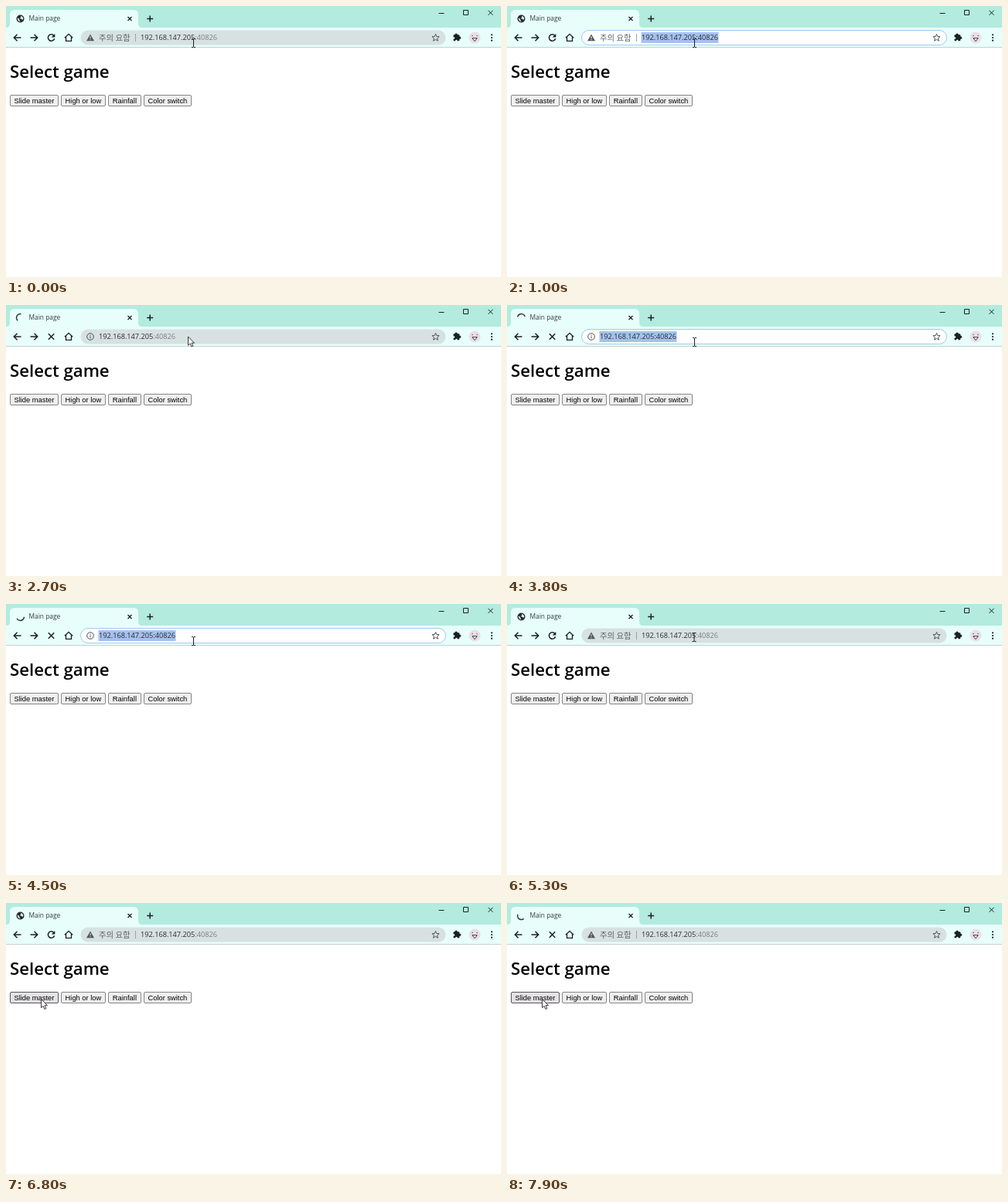
Animation, 640 px wide and 351 px high, one loop 8 s. Source, as an HTML page with a canvas:

```html
<!DOCTYPE html>
<html lang="en">
<head>
<meta charset="utf-8">
<title>Main page</title>
<style>
  html, body { margin: 0; width: 100%; height: 100%; overflow: hidden; background: #fff; }
  canvas { display: block; width: 640px; height: 351px; }
</style>
</head>
<body>
<canvas id="stage"></canvas>
<script>
const W = 640, H = 351, LOOP = 8000, STEP = 100;
const UI = '"Open Sans", "Noto Sans", sans-serif';
const HANGUL = '"Noto Sans CJK KR", "Noto Sans CJK", sans-serif';
const ARIAL = '"Liberation Sans", Arial, sans-serif';
const INK = '#1c2022', MINT = '#b3ebdf', BAR = '#e7fefb', FIELD = '#d7e1e1';
const HOST = '192.168.147.205', PORT = ':40826';
const BUTTONS = [
  ['Slide master', 5, 62], ['High or low', 71, 57],
  ['Rainfall', 132, 42], ['Color switch', 178, 61]
];

// Pointer path: time, x, y
const PATH = [
  [0, 242, 48], [2100, 242, 48], [2500, 235.5, 41], [3300, 235.5, 41], [3600, 242, 48],
  [5000, 242, 48], [5300, 241.5, 43], [5500, 241, 42], [5700, 237, 46], [5900, 205, 78],
  [6100, 140, 118], [6300, 80, 140], [6500, 52, 132], [6600, 45.5, 124.5]
];

const canvas = document.getElementById('stage');
const ctx = canvas.getContext('2d');
const scale = window.devicePixelRatio || 1;
canvas.width = W * scale;
canvas.height = H * scale;

const within = (t, a, b) => t >= a && t < b;

function text(str, x, y, font, color, align = 'left') {
  ctx.font = font;
  ctx.fillStyle = color;
  ctx.textAlign = align;
  ctx.fillText(str, x, y);
}

function shape(d, x, y, { fill, stroke, width = 1.4 }) {
  const path = new Path2D(d);
  ctx.save();
  ctx.translate(x, y);
  ctx.lineWidth = width;
  if (fill) { ctx.fillStyle = fill; ctx.fill(path); }
  if (stroke) { ctx.strokeStyle = stroke; ctx.stroke(path); }
  ctx.restore();
}

function disc(x, y, r, color) {
  ctx.beginPath();
  ctx.arc(x, y, r, 0, Math.PI * 2);
  ctx.fillStyle = color;
  ctx.fill();
}

function box(x, y, w, h, r, fill, stroke) {
  ctx.beginPath();
  ctx.roundRect(x, y, w, h, r);
  ctx.fillStyle = fill;
  ctx.fill();
  if (stroke) {
    ctx.strokeStyle = stroke;
    ctx.lineWidth = 1;
    ctx.stroke();
  }
}

function pointerAt(t) {
  const i = PATH.findIndex(p => p[0] > t);
  if (i < 0) return PATH[PATH.length - 1].slice(1);
  const [t0, x0, y0] = PATH[i - 1], [t1, x1, y1] = PATH[i];
  const k = (t - t0) / (t1 - t0);
  return [x0 + (x1 - x0) * k, y0 + (y1 - y0) * k];
}

function stateAt(t) {
  const firstLoad = within(t, 2000, 4900);
  const [x, y] = pointerAt(t);
  return {
    t, x, y,
    loading: firstLoad || t >= 7100,
    chip: !firstLoad,
    focus: within(t, 500, 2000) || within(t, 3700, 4600),
    selected: within(t, 500, 1400) || within(t, 3700, 4600),
    caret: within(t, 1400, 2000),
    beam: t < 2300 || within(t, 3400, 5800),
    hover: t >= 6500
  };
}

function spinner(t) {
  // One counter-clockwise turn takes 1320 ms
  const [ref, angle] = t < 5000 ? [3800, 268] : [7900, 125];
  const mid = (angle - 360 * (t - ref) / 1320) * Math.PI / 180;
  const half = 75 * Math.PI / 180;
  ctx.beginPath();
  ctx.arc(18.5, 16.5, 5, mid - half, mid + half);
  ctx.strokeStyle = '#30383a';
  ctx.lineWidth = 1.5;
  ctx.stroke();
}

function globe() {
  disc(18.5, 16.5, 5, '#24292b');
  shape('M-3.8-1.2 L-1.2 .6 L-1.2 2 L.3 3.8 L-1.5 3.4 Q-4 1.8-3.8-1.2Z M.2-3.8 Q3-3.4 3.9-.4 L2.6 1.8 L1.7.2 L-.9-.6 L1-1.7Z',
    18.5, 16.5, { fill: BAR });
}

function tabStrip(s) {
  ctx.fillStyle = MINT;
  ctx.fillRect(0, 0, W, 28);
  shape('M0 28 Q5 28 5 23 L5 11 Q5 5 11 5 L165 5 Q171 5 171 11 L171 23 Q171 28 176 28Z', 0, 0, { fill: BAR });
  if (s.loading) spinner(s.t); else globe();
  text('Main page', 29.5, 19.3, '8.4px ' + UI, '#353b3d');
  shape('M-2.5-2.5 L2.5 2.5 M2.5-2.5 L-2.5 2.5', 160, 16.5, { stroke: INK, width: 1.3 });
  shape('M-4 0H4 M0-4V4', 186.2, 16.5, { stroke: INK, width: 1.5 });
  const thin = { stroke: INK, width: 1 };
  shape('M-3.5 0H3.5', 563, 9.5, thin);
  shape('M-3-3H3V3H-3Z', 594.5, 8.5, thin);
  shape('M-3-3L3 3M3-3L-3 3', 626.5, 8.8, thin);
}

function navIcons(s) {
  const line = { stroke: INK, width: 1.5 };
  shape('M5 0H-4 M0-4.2L-4.2 0L0 4.2', 14.5, 41, line);
  shape('M-5 0H4 M0-4.2L4.2 0L0 4.2', 36.5, 41, line);
  if (s.loading) {
    shape('M-3.7-3.7L3.7 3.7M3.7-3.7L-3.7 3.7', 58.5, 41, line);
  } else {
    shape('M3.2-2.8 A4.2 4.2 0 1 0 4.1 1.2', 58.5, 41, line);
    shape('M4.8-5V-.4H.2Z', 58.5, 41, { fill: INK });
  }
  shape('M-5.2 .3L0-4.6L5.2 .3 M-3.5-1V4.4H3.5V-1', 81, 41, { stroke: INK, width: 1.3 });
}

function address(s) {
  const field = s.focus ? '#fff' : FIELD;
  box(96.5, 31.5, 472, 19, 9.5, field, s.focus ? '#a3c8ee' : null);
  const x = s.chip ? 174 : 120;
  const font = '9.18px ' + UI;
  if (s.chip) {
    shape('M0-4.6L5 4.2H-5Z', 109, 41, { fill: '#50585a' });
    shape('M0-1.8V1.2M0 2V3.2', 109, 41, { stroke: field, width: 1 });
    text('주의 요함', 120, 44.6, '10.4px ' + HANGUL, '#5c6466');
    ctx.fillStyle = '#98a3a5';
    ctx.fillRect(167, 36, 1, 10);
  } else {
    shape('M4.3 0A4.3 4.3 0 1 1-4.3 0A4.3 4.3 0 1 1 4.3 0Z M0-.6V2.4M0-2.4V-1.3', 109, 41,
      { stroke: '#4a5255', width: 1 });
  }
  if (s.selected) {
    ctx.fillStyle = '#a6c1ee';
    ctx.fillRect(x - .5, 34, 100, 14);
  }
  text(HOST, x, 44.3, font, '#262d30');
  const end = x + ctx.measureText(HOST).width;
  text(PORT, end, 44.3, font, s.selected ? '#262d30' : '#788184');
  if (s.caret) {
    ctx.fillStyle = '#555';
    ctx.fillRect(233, 35, 1, 12);
    shape('M-2 2.5H-4V-2.5H4.5 M-5 3.5H0 M1.5-1H5V3.5H1.5Z', 533, 41, { stroke: '#555d60', width: 1 });
  }
  shape('M0-4.6L1.3-1.5L4.6-1.3L2.1.9L2.9 4.2L0 2.4L-2.9 4.2L-2.1.9L-4.6-1.3L-1.3-1.5Z', 555.5, 41,
    { stroke: '#4b5356', width: 1 });
}

function extras() {
  box(578.5, 37.3, 7.8, 8, 1, INK);
  disc(582, 37.3, 1.7, INK);
  disc(586.5, 41.2, 1.7, INK);
  disc(579, 41.5, 1.2, BAR);
  disc(582.3, 45, 1.2, BAR);
  disc(606, 41, 7.5, '#eadfe6');
  disc(603, 38.5, .7, '#444');
  disc(609, 38.5, .7, '#444');
  shape('M-3.2 0H3.2L0 4Z', 606, 41.7, { fill: '#fff', stroke: '#333', width: 1 });
  for (const y of [37.3, 41, 44.7]) disc(628, y, 1.1, INK);
}

function page(s) {
  text('Select game', 5, 92.7, '600 22.2px ' + UI, '#000');
  BUTTONS.forEach(([label, x, w], i) => {
    const over = s.hover && i === 0;
    box(x + .5, 115.5, w, 14, 1.5, over ? '#e4e2e5' : '#efefef', over ? '#55585a' : '#858585');
    text(label, x + w / 2 + .4, 125.6, '9.33px ' + ARIAL, '#000', 'center');
  });
}

function pointer({ x, y, beam }) {
  if (beam) {
    shape('M-2.5-5.5H-.7L0-5L.7-5.5H2.5 M0-5V5 M-2.5 5.5H-.7L0 5L.7 5.5H2.5', x + .5, y,
      { stroke: '#1c1c1c', width: 1 });
  } else {
    shape('M0 0V11.2L2.6 8.9L4.4 13L6.3 12.2L4.5 8.2H8Z', x, y, { fill: '#fff', stroke: '#222', width: .9 });
  }
}

function draw(now) {
  const t = Math.floor(now % LOOP / STEP) * STEP;
  const s = stateAt(t);
  ctx.setTransform(scale, 0, 0, scale, 0, 0);
  ctx.fillStyle = '#fff';
  ctx.fillRect(0, 0, W, H);
  tabStrip(s);
  ctx.fillStyle = BAR;
  ctx.fillRect(0, 28, W, 25);
  ctx.fillStyle = '#c3d1cf';
  ctx.fillRect(0, 53, W, 1);
  navIcons(s);
  address(s);
  extras();
  page(s);
  pointer(s);
}

const start = performance.now();
function tick() {
  draw(performance.now() - start);
  requestAnimationFrame(tick);
}
tick();
</script>
</body>
</html>
```
